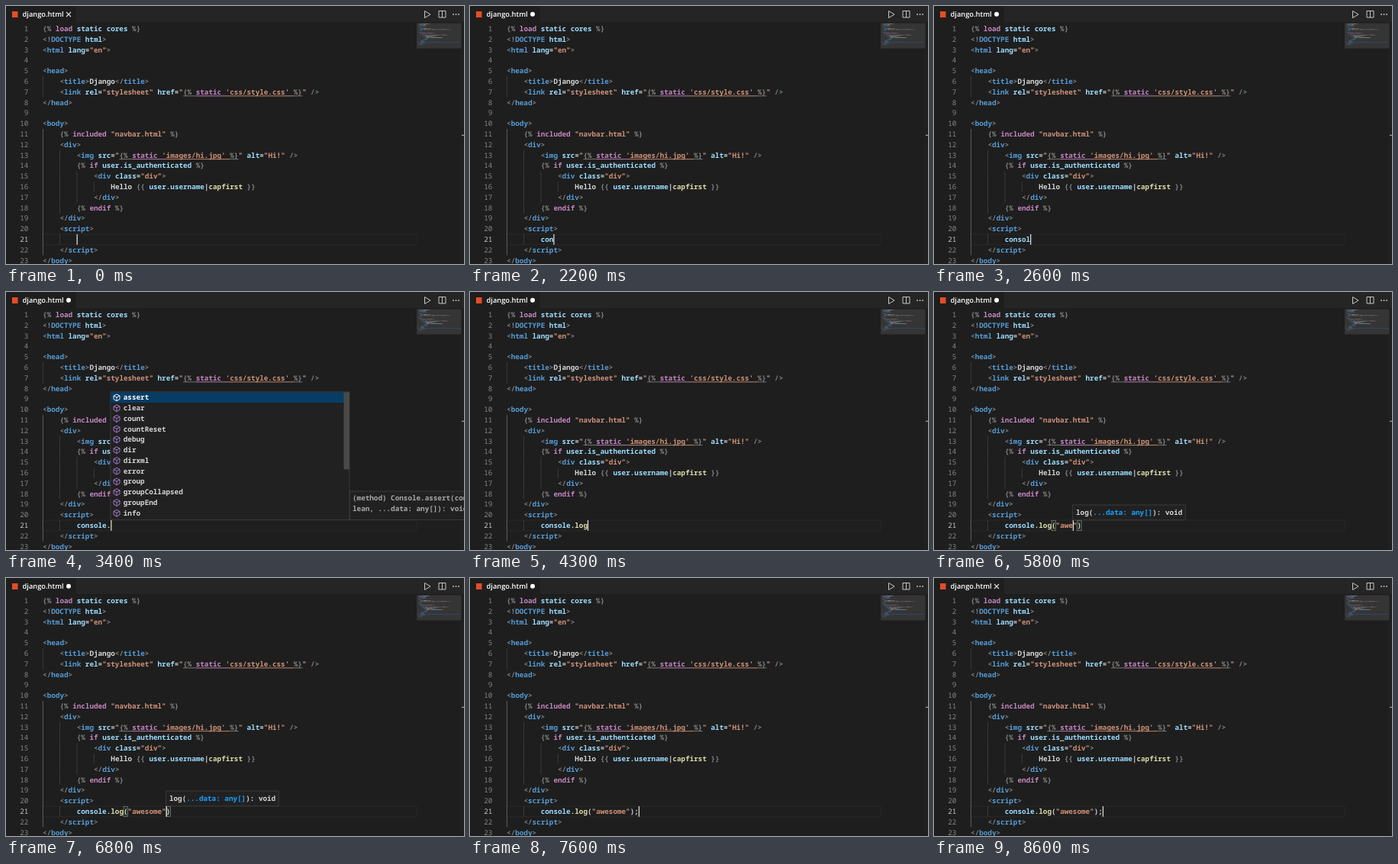
Write an HTML page that moves like this. It is 600x338 px and loops after 10000 ms.

```html
<!DOCTYPE html>
<html lang="en">
<head>
<meta charset="utf-8">
<title>Editor typing</title>
<style>
html, body { margin: 0; width: 100%; height: 100%; overflow: hidden; background: #1e1e1e; }
svg { display: block; width: 100%; height: 100%; }
text { font: 600 9.295px "Noto Sans Mono", "DejaVu Sans Mono", monospace; white-space: pre; text-rendering: geometricPrecision; }
.number { font-weight: 500; }
.ui { font: 600 9.3px "Open Sans", "Noto Sans", sans-serif; }
</style>
</head>
<body>
<svg id="stage" viewBox="0 0 600 338"></svg>
<script>
const LOOP = 10000, CHAR = 5.577, ROW = 13.8, LEFT = 48.1, TOP = 23;
const ACTIVE = 20, INDENT = 8;
const COLORS = { g: '#808080', t: '#569cd6', b: '#9cdcfe', s: '#ce9178', k: '#c586c0', w: '#d4d4d4', f: '#dcdcaa' };
const PANEL = '#212122', FRAME = { stroke: '#454545', 'stroke-width': 0.7 };
const stage = document.getElementById('stage');

// Each ~ starts a token; the next letter picks its colour.
const CODE = [
  '~g{% ~kload ~bstatic cores ~g%}',
  '~g<!~tDOCTYPE ~bhtml~g>',
  '~g<~thtml ~blang~w=~s"en"~g>',
  '',
  '~g<~thead~g>',
  '    ~g<~ttitle~g>~wDjango~g</~ttitle~g>',
  '    ~g<~tlink ~brel~w=~s"stylesheet" ~bhref~w=~s"~g{% ~kstatic ~s\'css/style.css\' ~g%}~s" ~g/>',
  '~g</~thead~g>',
  '',
  '~g<~tbody~g>',
  '    ~g{% ~kincluded ~s"navbar.html" ~g%}',
  '    ~g<~tdiv~g>',
  '        ~g<~timg ~bsrc~w=~s"~g{% ~kstatic ~s\'images/hi.jpg\' ~g%}~s" ~balt~w=~s"Hi!" ~g/>',
  '        ~g{% ~kif ~buser.is_authenticated ~g%}',
  '            ~g<~tdiv ~bclass~w=~s"div"~g>',
  '                ~wHello ~g{{ ~buser.username~w|~fcapfirst ~g}}',
  '            ~g</~tdiv~g>',
  '        ~g{% ~kendif ~g%}',
  '    ~g</~tdiv~g>',
  '    ~g<~tscript~g>',
  '        ',
  '    ~g</~tscript~g>',
  '~g</~tbody~g>'
];
const METHODS = 'assert clear count countReset debug dir dirxml error group groupCollapsed groupEnd info'.split(' ');

// Moment of each key press
const STATEMENT = 'console.log("awesome");';
const KEYS = [1500, 1600, 1800, 2300, 2400, 2600, 2800, 3100, 3700, 3900, 4100, 4600, 5000,
  5400, 5600, 5800, 6000, 6200, 6400, 6600, 6800, 7300, 7500];
const SAVED = 8400, LIST_ON = 3200, LIST_OFF = 4300;

function add(parent, tag, attrs, content) {
  const node = document.createElementNS('http://www.w3.org/2000/svg', tag);
  for (const key in attrs) node.setAttribute(key, attrs[key]);
  if (content !== undefined) node.textContent = content;
  parent.appendChild(node);
  return node;
}
const rect = (parent, x, y, width, height, fill, extra) => add(parent, 'rect', { x, y, width, height, fill, ...extra });
const label = (parent, x, y, fill, content, extra) => add(parent, 'text', { x, y, fill, ...extra }, content);
const stroke = (parent, d, color, width = 1) => add(parent, 'path', { d, fill: 'none', stroke: color, 'stroke-width': width });
const group = () => add(stage, 'g', {});
const colX = col => LEFT + col * CHAR;
const rowY = row => TOP + row * ROW;
const show = (node, on) => node.setAttribute('visibility', on ? 'visible' : 'hidden');

function tokens(line) {
  const [indent, ...source] = line.split('~');
  let col = indent.length;
  const parts = source.map(p => {
    const part = { fill: COLORS[p[0]], content: p.slice(1), col };
    col += part.content.length;
    return part;
  });
  return { indent: indent.length, parts };
}
function spans(node, parts) {
  node.textContent = '';
  for (const { fill, content } of parts) add(node, 'tspan', { fill }, content);
}

function drawTabs() {
  rect(stage, 0, 0, 600, 21, '#252526');
  rect(stage, 0, 0, 92, 21.5, '#1e1e1e');
  rect(stage, 8, 7, 7.5, 8, '#e44d26');
  label(stage, 21.5, 14, '#ffffff', 'django.html', { class: 'ui' });
  stroke(stage, 'M548.5 6.5V15.5L556 11Z', '#c5c5c5');
  stroke(stage, 'M567 6.5H576V15H567ZM571.5 6.5V15', '#c5c5c5');
  for (const x of [586, 589.5, 593]) add(stage, 'circle', { cx: x, cy: 11, r: 0.9, fill: '#c5c5c5' });
}

function drawMinimap() {
  const pitch = 1.2;
  rect(stage, 538, 22.5, 58.5, 33, '#353536');
  rect(stage, 538, 23.2 + ACTIVE * pitch, 58.5, 0.8, '#264f78');
  CODE.forEach((line, row) => {
    for (const { fill, content, col } of tokens(line).parts) {
      const width = content.trimEnd().length * 0.65;
      rect(stage, 540.5 + col * 0.65, 23.2 + row * pitch, width, 0.8, fill, { opacity: 0.5 });
    }
  });
  rect(stage, 596.5, 22, 0.5, 316, '#2b2b2b');
  rect(stage, 597, 168.7, 3, 1.3, '#a0a0a0');
}

function underline(parts, y) {
  const first = parts.findIndex(p => p.content === 'static ');
  if (first < 0) return;
  for (const { fill, content, col } of parts.slice(first - 1, first + 3)) {
    rect(stage, colX(col), y, content.length * CHAR, 0.9, fill);
  }
}

function drawCode() {
  rect(stage, LEFT, rowY(ACTIVE), 538 - LEFT, ROW, 'none', { stroke: '#2a2a2a', 'stroke-width': 0.8 });
  CODE.forEach((line, row) => {
    const { indent, parts } = tokens(line), y = rowY(row);
    label(stage, 29.3, y + 10, row === ACTIVE ? '#c6c6c6' : '#858585', row + 1, { 'text-anchor': 'end', class: 'number' });
    for (let col = 0; col < indent; col += 4) {
      const lit = col === 0 && row > 9;
      rect(stage, colX(col) - 0.2, y, 0.8, ROW, lit ? '#707070' : '#404040');
    }
    spans(label(stage, colX(indent), y + 10, COLORS.w), parts);
    underline(parts, y + 11.6);
  });
}

function cube(parent, x, y, color) {
  stroke(parent, `M${x} ${y - 4.3}l4 2v4.5l-4 2.3l-4 -2.3v-4.5zM${x - 4} ${y - 2.3}l4 2l4 -2M${x} ${y - 0.3}v4.8`, color, 0.9);
}

function makeList(items, details) {
  const g = group(), x = colX(16) - 0.4, bottom = 298.6;
  const height = items.length * 13.76 + 2.6, top = bottom - height;
  const many = items.length > 1;
  rect(g, x, top, 313, height, PANEL, FRAME);
  rect(g, x + 0.4, top + 0.4, 312, 13.8, '#073d65');
  items.forEach((name, i) => {
    const y = top + 0.4 + i * 13.76;
    cube(g, 145, y + 7, i ? '#b180d7' : '#ffffff');
    label(g, 153.8, y + 10, i ? COLORS.w : '#ffffff', name);
  });
  if (many) rect(g, 442.5, top + 0.5, 7.3, 101, '#4a4a4a');
  const boxHeight = details.length * ROW + 10;
  const boxTop = many ? bottom - boxHeight : top;
  rect(g, 450.2, boxTop, 160, boxHeight, PANEL, FRAME);
  details.forEach((line, i) => label(g, 454, boxTop + 12 + i * ROW, '#a8a8a8', line));
  return g;
}

function makeHint() {
  const g = group();
  rect(g, 0, 279, 147.5, 19.8, PANEL, FRAME);
  const text = label(g, 4.3, 292, COLORS.w);
  spans(text, [
    { fill: COLORS.w, content: 'log(' },
    { fill: '#18a3ff', content: '...data: any[]' },
    { fill: COLORS.w, content: '): void' }
  ]);
  text.children[1].setAttribute('font-weight', 800);
  return g;
}

drawTabs();
const closeMark = stroke(stage, 'M79 8l6 6M85 8l-6 6', '#e0e0e0', 1.1);
const dirtyDot = add(stage, 'circle', { cx: 82, cy: 10.8, r: 3, fill: '#ffffff' });
drawCode();
drawMinimap();
const brackets = [0, 1].map(() =>
  rect(stage, 0, rowY(ACTIVE) + 0.3, CHAR, ROW - 0.6, '#1c2a1c', { stroke: '#888888', 'stroke-width': 0.7 }));
const typedLine = label(stage, colX(INDENT), rowY(ACTIVE) + 10, COLORS.w);
const caret = rect(stage, 0, rowY(ACTIVE), 1.3, ROW, '#d8d8d8');
const fullList = makeList(METHODS, ['(method) Console.assert(condition?: boo', 'lean, ...data: any[]): void']);
const shortList = makeList(['log'], ['(method) Console.log(...data: any[]): v', 'oid']);
const hint = makeHint();

// Closing characters the editor inserts after the caret
function autoClose(count) {
  if (count < 12 || count > 21) return '';
  return count > 12 && count < 21 ? '")' : ')';
}

function render(t) {
  const count = KEYS.filter(k => k <= t).length;
  const content = STATEMENT.slice(0, count) + autoClose(count);
  const pieces = content.match(/^(\w*)(\.?)(\w*)(\(?)("?\w*"?)(.*)$/).slice(1);
  spans(typedLine, pieces.map((piece, i) => ({ fill: COLORS['bwfwsw'[i]], content: piece })));

  const x = colX(INDENT + count);
  const since = t - (count ? KEYS[count - 1] : 0);
  caret.setAttribute('x', x - 0.2);
  show(caret, t >= 8500 || since % 1000 < 500);

  const paired = count >= 12 && count <= 22;
  [11, content.lastIndexOf(')')].forEach((col, i) => {
    brackets[i].setAttribute('x', colX(INDENT + col));
    show(brackets[i], paired);
  });

  show(fullList, t >= LIST_ON && count === 8);
  show(shortList, count > 8 && t < LIST_OFF);
  show(hint, count >= 12 && count < 22);
  hint.setAttribute('transform', `translate(${x - 0.2} 0)`);

  const dirty = count > 0 && t < SAVED;
  show(dirtyDot, dirty);
  show(closeMark, !dirty);
}

const start = performance.now();
function tick() {
  render((performance.now() - start) % LOOP);
  requestAnimationFrame(tick);
}
tick();
</script>
</body>
</html>
```
